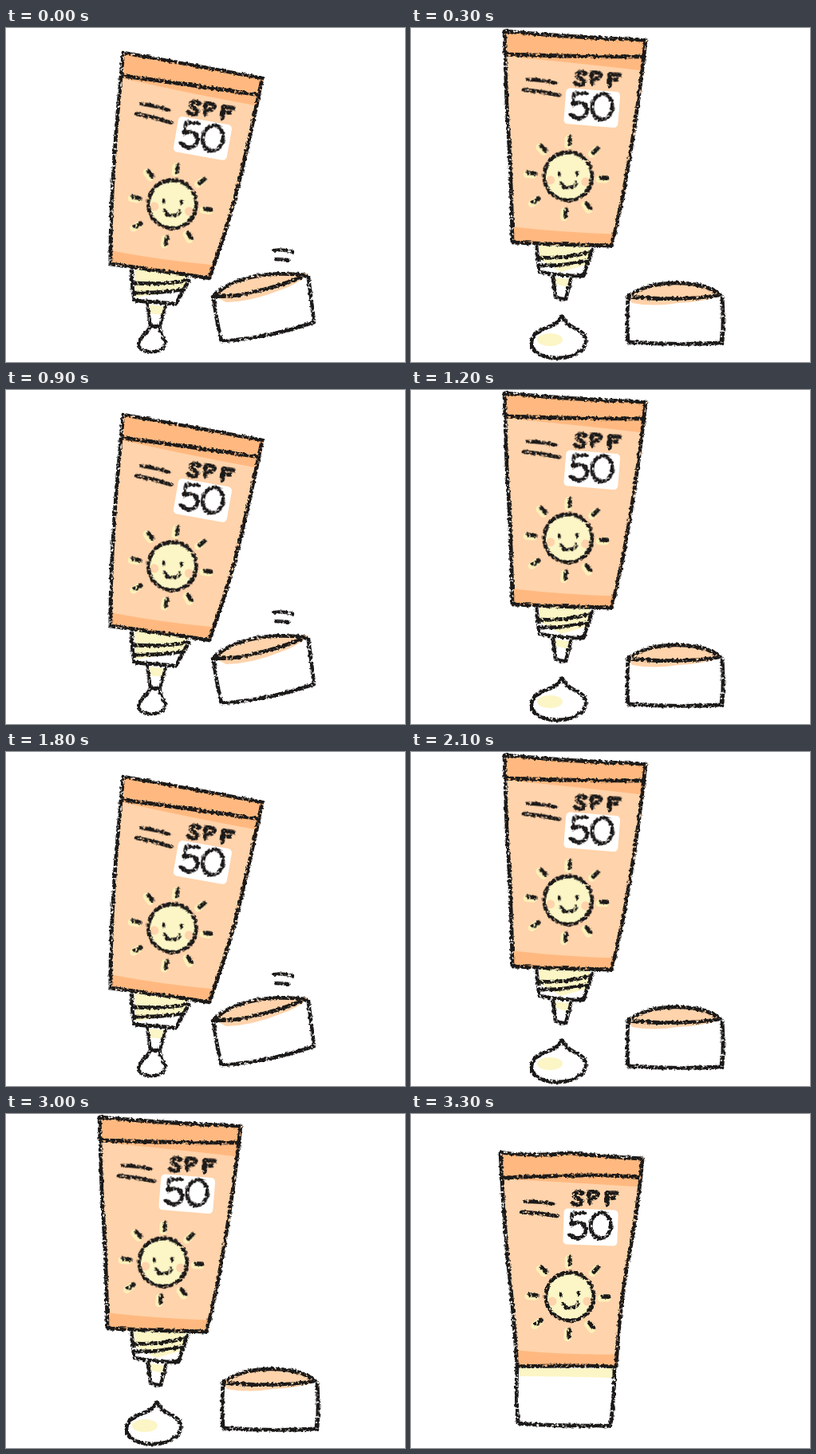
Write an HTML page that moves like this. It is 500 px wide and 419 px high and loops after 3600 ms.

```html
<!DOCTYPE html>
<html lang="en">
<head>
<meta charset="utf-8">
<title>Sunscreen</title>
<style>
html, body { margin: 0; width: 100%; height: 100%; overflow: hidden; background: #fff; }
svg { display: block; width: 100%; height: 100%; }
.ink { fill: none; stroke: #1b1918; stroke-width: 4.8; stroke-linecap: round; stroke-linejoin: round; filter: url(#crayon); }
.thin { stroke-width: 4.3; }
.bold { stroke-width: 5.4; }
.peach { fill: #ffd3ab; }
.orange { fill: #ffb980; }
.yellow { fill: #fcf5c5; }
.white { fill: #fff; }
</style>
</head>
<body>
<svg id="stage" viewBox="0 0 500 419" role="img" aria-label="Sunscreen tube, SPF 50">
  <defs>
    <filter id="crayon" filterUnits="userSpaceOnUse" x="-250" y="-250" width="1000" height="919" color-interpolation-filters="sRGB">
      <feTurbulence type="fractalNoise" baseFrequency=".28" numOctaves="2" seed="4" result="noise"/>
      <feDisplacementMap in="SourceGraphic" in2="noise" scale="4" xChannelSelector="R" yChannelSelector="G" result="rough"/>
      <feColorMatrix in="noise" values="0 0 0 0 0  0 0 0 0 0  0 0 0 0 0  0 0 6 0 -1.5" result="grain"/>
      <feComposite in="rough" in2="grain" operator="in"/>
    </filter>
  </defs>
</svg>
<script>
const POSE_MS = 300;

const fill = (color, d) => `<path class="${color}" d="${d}"/>`;
const ink = (d, extra = '') => `<path class="ink ${extra}" d="${d}"/>`;

// Ray centres around the sun.
const rays = [[0, -45], [33, -34], [45, 0], [27, 36], [-1, 46], [-39, 32], [-46, -2], [-33, -34]];
const rayPath = rays.map(([x, y]) => {
  const r = Math.hypot(x, y), dx = x / r * 4, dy = y / r * 4;
  return `M${x - dx} ${y - dy}L${x + dx} ${y + dy}`;
}).join('');

// Label art, centred on the sun.
const label = (x, y, angle) => `<g transform="translate(${x} ${y}) rotate(${angle})">
  <rect class="white" x="-34" y="-22.5" width="68" height="45" rx="5" transform="translate(26 -87) rotate(2)"/>
  ${ink('M-56-119Q-38-120-21-116M-60-106Q-38-105-16-101')}
  ${ink('M16-130Q7-133 5-127Q5-124 11-123Q17-121 14-117Q9-113 4-117M24-131L25-117M24-131Q35-133 35-128Q34-123 26-123M46-130L47-116M46-130L59-130M47-123L56-124', 'bold')}
  ${ink('M19-105L3-104L2-90Q11-96 18-90Q23-82 16-75Q8-71 0-77M39-105C22-104 22-73 38-73C56-74 55-105 39-105')}
  <path d="${rayPath}" transform="translate(-2 2)" stroke="#fcf0ba" stroke-width="9" stroke-linecap="round"/>
  ${ink(rayPath, 'bold')}
  <circle class="yellow" r="29.5"/>
  <circle r="5.5" cx="-22" cy="6" fill="#ffd3ab"/>
  <circle r="5.5" cx="22" cy="6" fill="#ffd3ab"/>
  ${ink('M0-30C17-30 30-17 30 0C30 17 17 30 0 30C-17 30-30 17-30 0C-30-17-17-30 0-30')}
  ${ink('M-11-4L-11-1M11-5L11-2M-9 9Q-6 15 1 14Q10 14 10 7', 'thin')}
</g>`;

const tube = ({ outline, seam, topBand, bottomBand, art }) =>
  `<g transform="translate(1.5 .5)">${fill('peach', outline)}${fill('orange', topBand)}${fill('orange', bottomBand)}</g>
  ${ink(outline + seam)}${label(...art)}`;

const tilted = fill('yellow', 'M161 298L230 308L223 328L162 338Z')
  + fill('yellow', 'M178 347L199 349L197 360L180 358Z')
  + tube({
    outline: 'M147 31Q232 46 321 63Q305 143 285 221Q273 262 255 314Q198 305 131 296Q130 200 147 31Z',
    seam: 'M146 60Q230 71 317 84',
    topBand: 'M147 31Q232 46 321 63L313 97Q230 82 146 63Z',
    bottomBand: 'M131 279Q194 291 260 297L255 314Q198 305 131 296Z',
    art: [208.5, 221, 8],
  })
  + ink('M158 305Q157 323 161 342Q189 344 213 346L229 317M160 320Q200 322 226 317M161 332Q193 333 221 328')
  + ink('M177 347L181 374C178 383 165 389 166 399C172 409 196 409 200 397C199 386 192 383 193 374L200 349M181 374L193 374', 'thin')
  + fill('peach', 'M260 336C278 317 315 304 379 308Q367 321 343 329Q309 343 276 344Z')
  + ink('M260 336C281 315 323 304 376 310Q342 325 302 333Q280 338 260 336Q263 365 270 393Q333 388 386 369L379 313')
  + ink('M335 279Q347 277 360 281M338 290L354 291', 'thin');

const squeezed = fill('yellow', 'M160 269L225 271L220 297L188 306L162 291Z')
  + fill('yellow', 'M179 313L199 315L196 325L181 321Z')
  + tube({
    outline: 'M117 4Q202 12 294 15Q286 92 272 174Q263 229 251 273Q189 272 127 269Q126 190 120 96Z',
    seam: 'M119 33Q200 36 291 36',
    topBand: 'M117 4Q202 12 294 15L289 53Q212 44 119 35Z',
    bottomBand: 'M127 249Q188 256 255 258L251 273Q189 272 127 269Z',
    art: [197, 186, 2.5],
  })
  + ink('M157 273L161 306Q187 311 216 311L227 278M160 288Q191 290 225 281M161 298Q194 299 222 291M178 312L181 337Q188 341 194 340L201 313')
  + '<ellipse class="yellow" cx="174" cy="391" rx="16" ry="8"/>'
  + ink('M188 361C184 379 152 374 151 394C150 410 170 414 187 414C205 413 220 404 219 390C217 377 198 379 188 361Z')
  + fill('peach', 'M272 336C298 313 366 314 389 335Q367 344 334 345Q304 350 277 345Z')
  + ink('M272 337C297 315 364 314 388 335Q337 343 272 337Q270 367 272 394Q330 398 390 395Q392 368 390 337');

const closed = tube({
  outline: 'M112 48Q151 54 198 49Q248 54 290 56Q285 117 270 195Q260 257 257 317Q196 315 133 317Q128 241 121 181Q115 114 112 48Z',
  seam: 'M113 80Q170 78 213 77Q253 76 288 80',
  topBand: 'M112 48Q151 54 198 49Q248 54 290 56L286 91Q210 86 115 81Z',
  bottomBand: 'M132 296Q193 302 259 301L257 317Q196 315 133 317Z',
  art: [199, 229, 0],
}) + fill('yellow', 'M136 319L253 319L253 331Q191 329 136 329Z')
  + ink('M133 317Q131 354 134 388Q190 392 250 391Q255 354 255 318');

const stage = document.getElementById('stage');
stage.insertAdjacentHTML('beforeend',
  [tilted, squeezed, closed].map(pose => `<g class="pose" visibility="hidden">${pose}</g>`).join(''));
const poses = [...stage.querySelectorAll('.pose')];

function draw() {
  const current = Math.floor(performance.now() / POSE_MS) % poses.length;
  poses.forEach((pose, i) => pose.setAttribute('visibility', i === current ? 'visible' : 'hidden'));
  requestAnimationFrame(draw);
}
draw();
</script>
</body>
</html>
```
